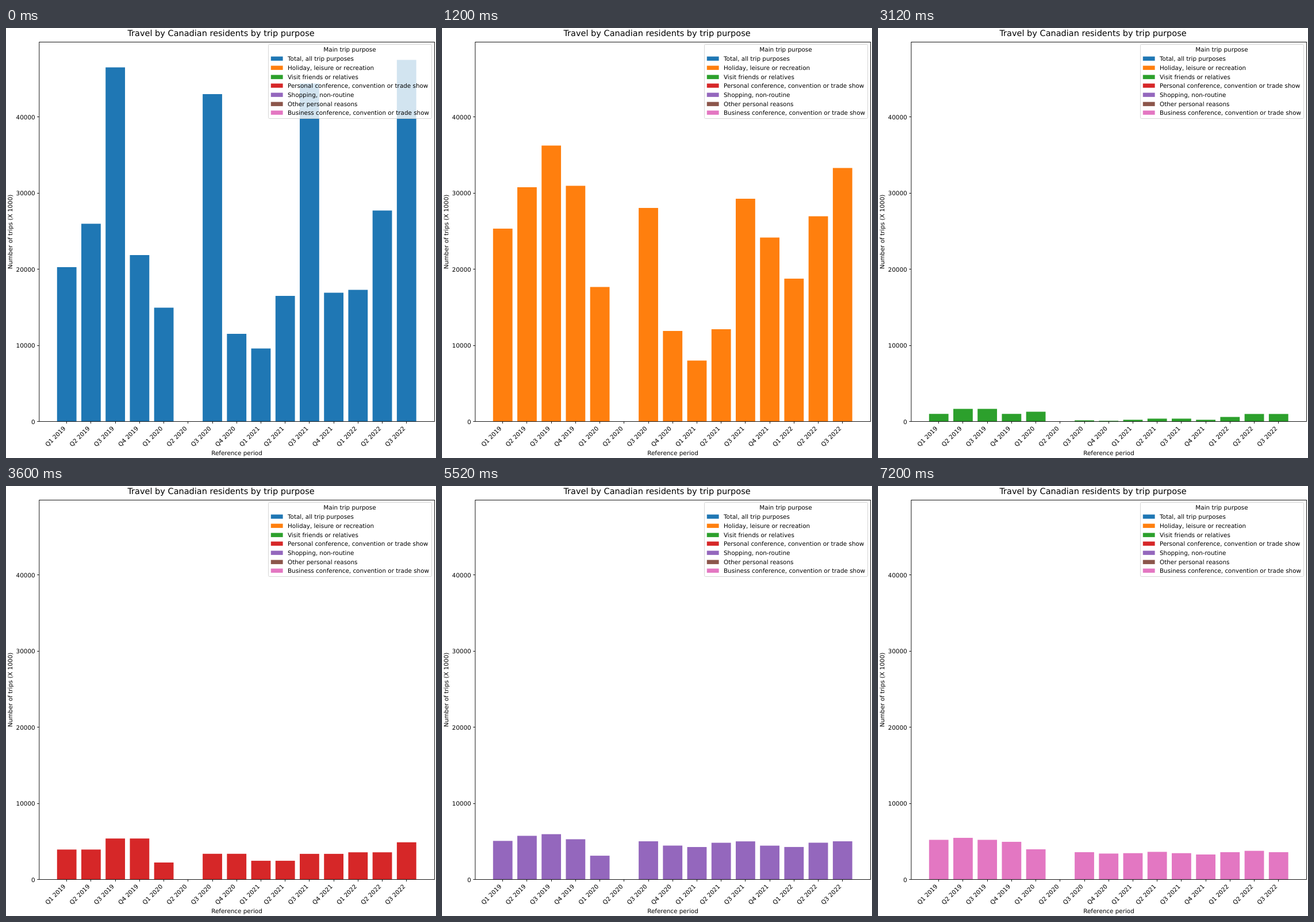
Recreate the animation shown at these times as an HTML page with a canvas. Size 748 by 748 pixels, loop 8400 ms.

```html
<!DOCTYPE html>
<html lang="en">
<head>
<meta charset="utf-8">
<title>Travel by trip purpose</title>
<style>
  html, body { margin: 0; height: 100%; overflow: hidden; background: #fff; }
  canvas { display: block; }
</style>
</head>
<body>
<canvas id="chart" width="748" height="748"></canvas>
<script>
const ctx = document.getElementById('chart').getContext('2d');
const HOLD = 1200, BASE = 684.5, LEFT = 57.8, RIGHT = 745.5, TOP = 24.5;
const STEP = 42.22, FIRST = 105.7, BAR = 33.8, EM = 10.39;
const QUARTERS = 15, NO_DATA = 5;

// Levels cover 2019, early 2020, late 2020, 2021 and 2022; the swing peaks once a year.
const seasonal = (levels, swing, peak) => i => {
  const phase = Math.floor(i / 4) + (i > NO_DATA ? 1 : 0);
  return levels[phase] * (1 + swing * Math.cos((i - peak) * Math.PI / 2));
};
const listed = heights => i => heights[i];

// Label, colour and bar height in pixels for each quarter
const series = [
  ['Total, all trip purposes', '#1f77b4',
    listed([268.5, 344, 616, 289.5, 198, 0, 569.5, 152.5, 127, 218.5, 588, 224, 229, 367, 629])],
  ['Holiday, leisure or recreation', '#ff7f0e',
    listed([335.5, 407.5, 480, 410, 234, 0, 371.5, 157.5, 106, 160.5, 387.5, 320, 248.5, 357, 441])],
  ['Visit friends or relatives', '#2ca02c', seasonal([17.6, 22.6, 1.6, 4, 10.5], 0.35, 1.5)],
  ['Personal conference, convention or trade show', '#d62728',
    seasonal([61.7, 35, 38.7, 38.6, 56], 0.22, 2.5)],
  ['Shopping, non-routine', '#9467bd', seasonal([73, 45, 61.5, 61.4, 61.5], 0.09, 1.7)],
  ['Other personal reasons', '#8c564b', seasonal([28.7, 21.5, 1.8, 4, 13.8], 0.2, 1.5)],
  ['Business conference, convention or trade show', '#e377c2',
    seasonal([69, 52.5, 47.5, 45.8, 47.5], 0.05, 1)],
];

function text(str, x, y, align = 'left', size = EM, angle = 0) {
  ctx.save();
  ctx.translate(x, y);
  ctx.rotate(angle);
  ctx.font = `${size}px "DejaVu Sans", sans-serif`;
  ctx.textRendering = 'geometricPrecision';
  ctx.textAlign = align;
  ctx.fillStyle = '#000';
  ctx.fillText(str, 0, 0);
  ctx.restore();
}

function line(x1, y1, x2, y2) {
  ctx.beginPath();
  ctx.moveTo(x1, y1);
  ctx.lineTo(x2, y2);
  ctx.stroke();
}

function drawBars([, color, height]) {
  ctx.fillStyle = color;
  for (let i = 0; i < QUARTERS; i++) {
    if (i === NO_DATA) continue;
    const h = height(i);
    ctx.fillRect(FIRST + STEP * i - BAR / 2, BASE - h, BAR, h);
  }
}

function drawAxes() {
  ctx.strokeStyle = '#000';
  ctx.lineWidth = 0.9;
  ctx.strokeRect(LEFT, TOP, RIGHT - LEFT, BASE - TOP);
  for (let i = 0; i < 5; i++) {
    const y = BASE - i * 132.4;
    const snapped = Math.floor(y) + 0.5;
    line(LEFT - 3.6, snapped, LEFT, snapped);
    text(i * 10000, 50.6, Math.round(y + 4), 'right');
  }
  for (let i = 0; i < QUARTERS; i++) {
    const x = FIRST + STEP * i;
    const snapped = Math.floor(x) + 0.5;
    line(snapped, BASE, snapped, BASE + 3.6);
    text(`Q${i % 4 + 1} ${2019 + (i >> 2)}`, x - 1.5, 697.4, 'right', EM, -Math.PI / 4);
  }
  text('Travel by Canadian residents by trip purpose', 374, 14, 'center', 14.5);
  text('Reference period', 401.5, 743, 'center');
  text('Number of trips (X 1000)', 11, 354.5, 'center', EM, -Math.PI / 2);
}

function drawLegend() {
  ctx.beginPath();
  ctx.roundRect(456.5, 28.5, 284, 129, 2);
  ctx.fillStyle = 'rgba(255,255,255,.8)';
  ctx.fill();
  ctx.strokeStyle = 'rgba(204,204,204,.8)';
  ctx.lineWidth = 1;
  ctx.stroke();
  text('Main trip purpose', 598, 41, 'center');
  series.forEach(([label, color], i) => {
    const y = Math.round(57.2 + i * 15.7);
    ctx.fillStyle = color;
    ctx.fillRect(460.8, y - 7.4, 20.8, 7.3);
    text(label, 490, y);
  });
}

function frame(now) {
  ctx.fillStyle = '#fff';
  ctx.fillRect(0, 0, 748, 748);
  drawBars(series[Math.floor(now / HOLD) % series.length]);
  drawAxes();
  drawLegend();
  requestAnimationFrame(() => frame(performance.now()));
}
frame(0);
</script>
</body>
</html>
```
